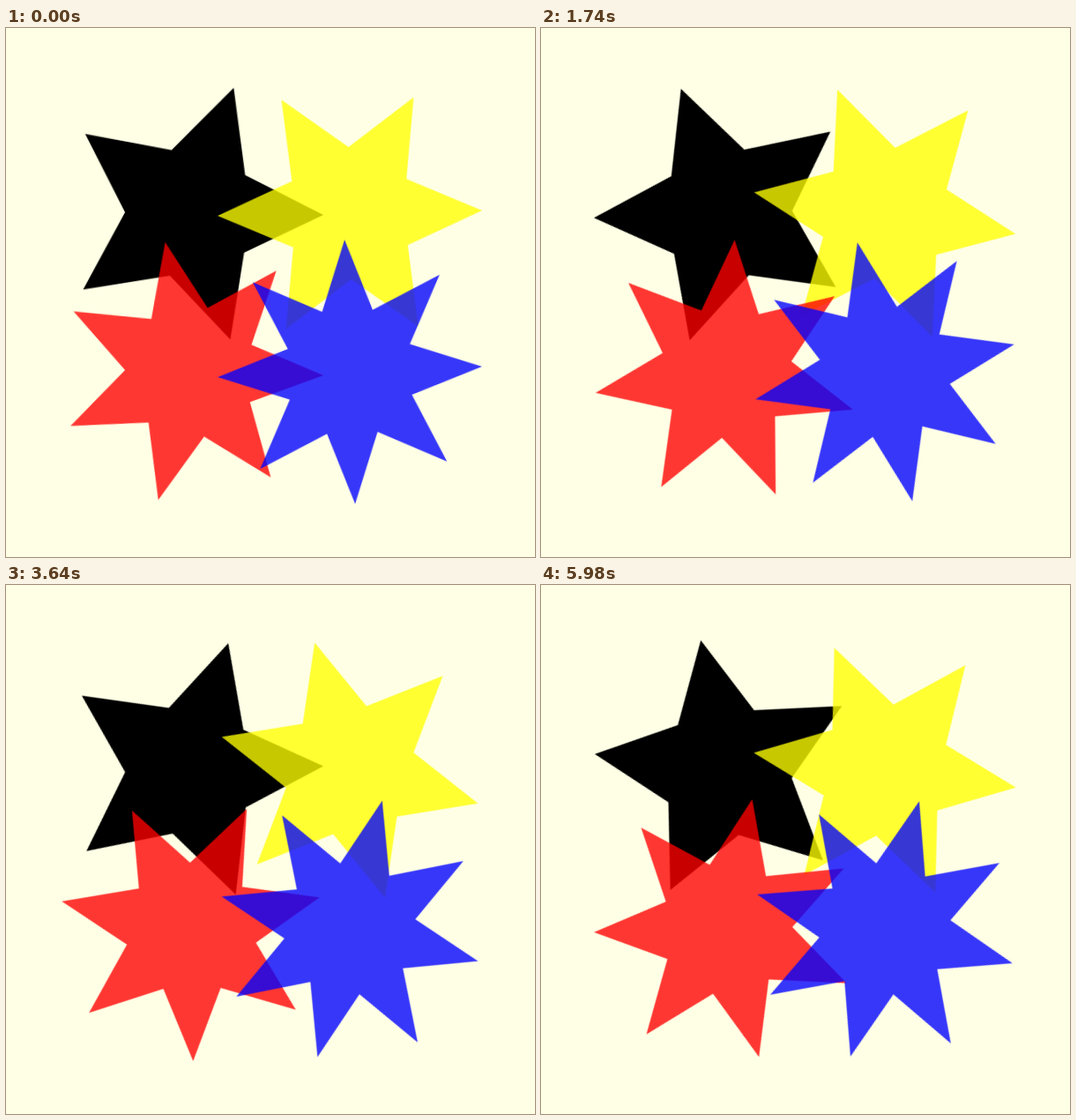
Recreate the animation shown at these times as an HTML page. Size 600 by 600 pixels, loop 6000 ms.

```html
<!DOCTYPE html>
<html lang="en">
<head>
<meta charset="utf-8">
<title>Four turning stars</title>
<style>
  html, body { margin: 0; width: 100%; height: 100%; overflow: hidden; background: #ffffe6; }
  svg { display: block; width: 100%; height: 100%; }
  /* 300 steps of 20 ms; the small delay keeps step edges clear of rounding */
  polygon { animation: turn 6s steps(300, end) -1ms infinite; }
  @keyframes turn {
    from { transform: rotate(calc(2 * var(--step))); }
    to { transform: rotate(calc(302 * var(--step))); }
  }
</style>
</head>
<body>
<svg viewBox="0 0 600 600" xmlns="http://www.w3.org/2000/svg"></svg>
<script>
  const OUTER = 150, INNER = 75;
  const svg = document.querySelector('svg');

  function starPoints(tips) {
    return Array.from({ length: tips * 2 }, (_, i) => {
      const r = i % 2 ? INNER : OUTER;
      const a = Math.PI * i / tips;
      return (r * Math.cos(a)).toFixed(3) + ',' + (r * Math.sin(a)).toFixed(3);
    }).join(' ');
  }

  function addStar({ x, y, tips, fill, alpha, step }) {
    const group = document.createElementNS(svg.namespaceURI, 'g');
    const star = document.createElementNS(svg.namespaceURI, 'polygon');
    group.setAttribute('transform', `translate(${x} ${y})`);
    star.setAttribute('points', starPoints(tips));
    star.setAttribute('fill', fill);
    star.setAttribute('fill-opacity', alpha);
    star.style.setProperty('--step', step.toFixed(8) + 'rad');
    group.append(star);
    svg.append(group);
  }

  const GLASS = 200 / 255;
  [
    { x: 210, y: 210, tips: 5, fill: '#000', alpha: 1, step: 1 / 150 },
    { x: 390, y: 210, tips: 6, fill: '#ff0', alpha: GLASS, step: -1 / 100 },
    { x: 210, y: 390, tips: 7, fill: '#f00', alpha: GLASS, step: 1 / 75 },
    { x: 390, y: 390, tips: 8, fill: '#00f', alpha: GLASS, step: -1 / 50 }
  ].forEach(addStar);
</script>
</body>
</html>
```
